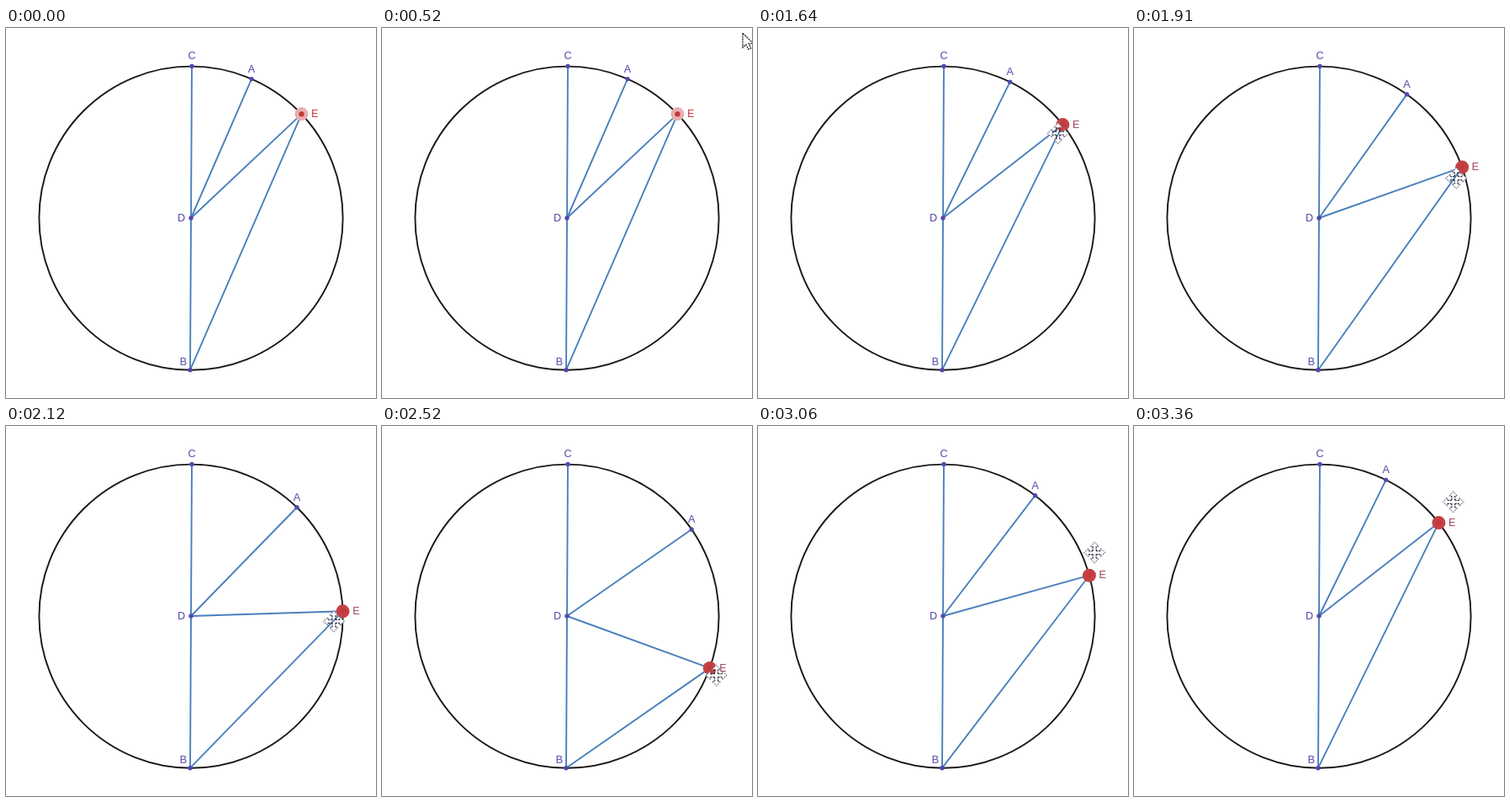
An HTML page that plays this animation: 440 px wide and 440 px high, repeating every 3390 ms.

```html
<!DOCTYPE html>
<html lang="en">
<head>
<meta charset="utf-8">
<title>Angles in a circle</title>
<style>
  html, body { margin: 0; width: 100%; height: 100%; overflow: hidden; background: #fff; }
  svg { display: block; width: 100%; height: 100%; }
  text { font: 12.5px "Liberation Sans", Arial, sans-serif; text-anchor: middle; fill: #655bb4; stroke: #655bb4; stroke-width: .2; }
  .seg { fill: none; stroke: #4a80bc; stroke-width: 1.9; stroke-linejoin: round; }
  .dot { fill: #5348ae; }
  .ring { fill: none; stroke: #181818; stroke-width: 1.9; }
  .e { fill: #c9464e; stroke: #c9464e; }
  .drag .e { fill: #a64f6b; stroke: #a64f6b; }
  #halo { fill: #e8b0b2; }
  .drag #halo { fill: #c54043; }
  #move { fill: #fff; stroke: #2c2c3c; stroke-width: 1.3; stroke-dasharray: 2 1; }
  .head { stroke: #7d7d90; stroke-width: 1.1; }
  #move, .drag #arrow { visibility: hidden; }
  .drag #move { visibility: visible; }
</style>
</head>
<body>
<svg id="stage" viewBox="0 0 440 440">
  <circle class="ring" cx="220" cy="226.2" r="180.6"/>
  <path class="seg" d="M221 45.5L220 226L219 406.7"/>
  <path class="seg" id="rays"/>
  <circle class="dot" cx="221" cy="45.5" r="2.7"/>
  <circle class="dot" cx="220" cy="226" r="2.7"/>
  <circle class="dot" cx="219" cy="406.7" r="2.7"/>
  <text x="221" y="37.3">C</text>
  <text x="208.5" y="229.8">D</text>
  <text x="211" y="400.6">B</text>
  <g id="a"><circle class="dot" r="2.7"/><text y="-7.8">A</text></g>
  <g id="e">
    <circle id="halo" r="8"/>
    <circle r="3.2" fill="#c23a3e"/>
    <text class="e" x="15.8" y="3.6">E</text>
  </g>
  <path id="arrow" d="M0 0V17.2L4 13.6L6.8 19.3L9.8 17.8L7.2 12.4H12.6Z"
        fill="#fff" stroke="#222" stroke-width="1.2" stroke-dasharray="2.4 .7"/>
  <g id="move">
    <g id="arm"><path class="head" d="M-2 -7H-5L0 -12.4L5 -7H2"/><path d="M-2 -7V-2M2 -7V-2"/></g>
    <use href="#arm" transform="rotate(90)"/>
    <use href="#arm" transform="rotate(180)"/>
    <use href="#arm" transform="rotate(270)"/>
  </g>
</svg>
<script>
const LOOP = 3390, ENTER = 420, ARRIVE = 900, PRESS = 1520;
const CX = 220, CY = 226.2, R = 180.6;
const REST = 43.3, TOP = 89.7; // resting angle of E, angle of C
const $ = id => document.getElementById(id);

// Sine ease from 0 to 1 between two times
function ease(t, from, to) {
  const u = Math.min(1, Math.max(0, (t - from) / (to - from)));
  return (1 - Math.cos(Math.PI * u)) / 2;
}

function polar(deg, r) {
  const rad = deg * Math.PI / 180;
  return [CX + r * Math.cos(rad), CY - r * Math.sin(rad)];
}

// Angle of a swing down the right side and back up
function swing(t, down, up, low, high) {
  return REST + (low - REST) * ease(t, ...down) + (high - low) * ease(t, ...up);
}

// The pointer runs slightly ahead of E and drifts outwards
function dragPointer(t) {
  const angle = swing(t, [1400, 2545], [2560, 3340], -21.7, 40.4);
  const r = 170 + 21 * ease(t, 2120, 2520) + 19 * ease(t, 2900, 3400);
  return polar(angle, r);
}

function enterPointer(t) {
  const left = 1 - ease(t, ENTER, ARRIVE);
  return [352 + 86 * left, 92 - 96 * left];
}

const place = (id, p) => $(id).setAttribute("transform", `translate(${p})`);

function draw(t) {
  const drag = t >= PRESS;
  const angle = drag ? swing(t, [1422, 2595], [2600, 3405], -20.6, 38.4) : REST;
  const e = polar(angle, R), a = polar((angle + TOP) / 2, R);
  $("stage").classList.toggle("drag", drag);
  $("rays").setAttribute("d", `M${a}L220 226L${e}L219 406.7`);
  place("a", a);
  place("e", e);
  place("move", dragPointer(t));
  place("arrow", enterPointer(t));
  $("arrow").style.display = t < ENTER ? "none" : "";
}

const start = performance.now();
function tick() {
  draw((performance.now() - start) % LOOP);
  requestAnimationFrame(tick);
}
tick();
</script>
</body>
</html>
```
